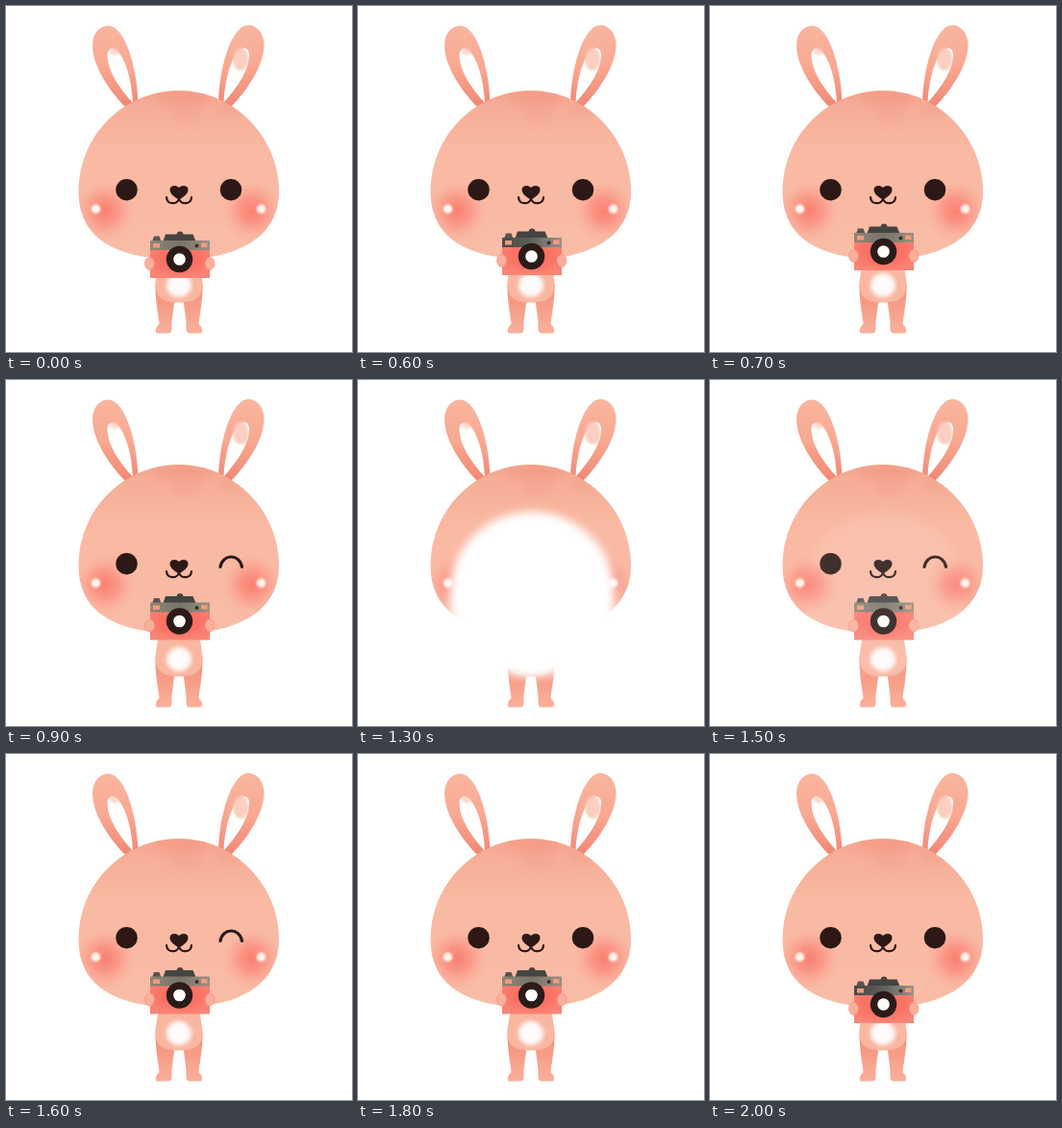
An HTML page that plays this animation: 360x360 px, repeating every 2.1 s.

```html
<!DOCTYPE html>
<html lang="en">
<head>
<meta charset="utf-8">
<title>Rabbit with a camera</title>
<style>
  html, body { margin: 0; width: 100%; height: 100%; overflow: hidden; background: #fff; }
  svg { display: block; width: 100%; height: 100%; }
</style>
</head>
<body>
<svg viewBox="0 0 360 360">
  <defs>
    <linearGradient id="skin" x1="0" y1="0" x2="0" y2="1">
      <stop offset="0" stop-color="#f6a68f"/>
      <stop offset=".14" stop-color="#f7af98"/>
      <stop offset=".36" stop-color="#f9b9a2"/>
      <stop offset="1" stop-color="#f9bca6"/>
    </linearGradient>
    <linearGradient id="earSkin" x1="0" y1="0" x2="0" y2="1">
      <stop offset="0" stop-color="#f9b59e"/>
      <stop offset=".5" stop-color="#f8a992"/>
      <stop offset="1" stop-color="#f18672"/>
    </linearGradient>
    <linearGradient id="legSkin" x1="0" y1="0" x2="0" y2="1">
      <stop offset="0" stop-color="#f38f7a"/>
      <stop offset=".5" stop-color="#f69e88"/>
      <stop offset="1" stop-color="#f9b19b"/>
    </linearGradient>
    <radialGradient id="cheek">
      <stop offset="0" stop-color="#fb7567" stop-opacity=".85"/>
      <stop offset=".4" stop-color="#fb8073" stop-opacity=".62"/>
      <stop offset=".75" stop-color="#fa9485" stop-opacity=".22"/>
      <stop offset="1" stop-color="#f9a896" stop-opacity="0"/>
    </radialGradient>
    <radialGradient id="coral" cx=".5" cy=".35" r=".65">
      <stop offset="0" stop-color="#f9685a"/>
      <stop offset=".6" stop-color="#fa7567"/>
      <stop offset="1" stop-color="#fa8475"/>
    </radialGradient>
    <linearGradient id="metal">
      <stop offset="0" stop-color="#8f8676"/>
      <stop offset=".5" stop-color="#77746a"/>
      <stop offset="1" stop-color="#99917f"/>
    </linearGradient>
    <linearGradient id="metalDark">
      <stop offset="0" stop-color="#4b4a48"/>
      <stop offset=".45" stop-color="#5d5d59"/>
      <stop offset="1" stop-color="#96948a"/>
    </linearGradient>
    <filter id="soft1" x="-50%" y="-50%" width="200%" height="200%"><feGaussianBlur stdDeviation=".8"/></filter>
    <filter id="soft2" x="-50%" y="-50%" width="200%" height="200%"><feGaussianBlur stdDeviation="2"/></filter>
    <filter id="soft5" x="-50%" y="-50%" width="200%" height="200%"><feGaussianBlur stdDeviation="5"/></filter>
    <path id="headShape" d="M180 88C236 88 284 135 284 193C284 240 242 263.500 180 263.500C116 263.500 75.500 243 75.500 193C75.500 134 123 88 180 88Z"/>
    <clipPath id="headClip"><use href="#headShape"/></clipPath>
    <g id="ear">
      <path fill="url(#earSkin)" d="M125 106C107 88 90 62 90 41C90 28 98 20 107 20.500C122 21 136 58 137.500 101Z"/>
      <path fill="#fff" d="M132 101C117 84 106 68 105.500 52C105 43 113 42 118 49C126 60 131 80 132 101Z"/>
    </g>
    <path id="leg" fill="url(#legSkin)" d="M155.500 288C155 305 158 318 159.500 331C156 334 154.500 338 157 340.500H168C171 341 172.500 339 172.500 336C172 325 174.500 318 175.500 303Z"/>
  </defs>

  <rect width="360" height="360" fill="#fff"/>

  <use href="#ear"/>
  <use href="#ear" transform="matrix(-1 0 0 1 358.500 -.5)"/>
  <ellipse cx="113" cy="47" rx="5" ry="4" fill="#f9c0ae" opacity=".6" filter="url(#soft1)"/>
  <ellipse cx="244" cy="55" rx="8" ry="12" fill="#fac6b6" opacity=".85" filter="url(#soft1)"/>

  <use href="#leg"/>
  <use href="#leg" transform="matrix(-1 0 0 1 360 0)"/>
  <path fill="#f9b6a0" d="M160 255H200C202 275 204.500 282 204.500 290C204.500 302 198 308.500 180 308.500C162 308.500 155.500 302 155.500 290C155.500 282 158 275 160 255Z"/>
  <ellipse cx="180" cy="290.500" rx="13" ry="12.500" fill="#fff" opacity=".95" filter="url(#soft2)"/>

  <use href="#headShape" fill="url(#skin)"/>
  <g clip-path="url(#headClip)">
    <g fill="#eb8170" filter="url(#soft5)">
      <ellipse cx="184" cy="95" rx="30" ry="8" opacity=".3"/>
      <ellipse cx="188" cy="113" rx="16" ry="8" opacity=".17"/>
      <ellipse cx="233" cy="108" rx="14" ry="9" opacity=".14"/>
    </g>
    <circle cx="103" cy="213" r="33" fill="url(#cheek)"/>
    <circle cx="256" cy="213" r="33" fill="url(#cheek)"/>
  </g>
  <g fill="#fff5ee" filter="url(#soft1)">
    <circle cx="93.500" cy="211.300" r="4.700"/>
    <circle cx="265.500" cy="211.300" r="4.700"/>
  </g>

  <g fill="#2c1815">
    <circle cx="125.500" cy="191.200" r="11.200"/>
    <circle id="eye" cx="234" cy="191.200" r="11.200"/>
    <path d="M180 201.500C175.500 199 170.500 195.500 170.500 191C170.500 186.500 177 185.500 180 189C183 185.500 189.500 186.500 189.500 191C189.500 195.500 184.500 199 180 201.500Z"/>
  </g>
  <g fill="none" stroke="#2c1815" stroke-linecap="round">
    <path stroke-width="2.200" d="M167 199C167.500 207 178 207 180 200.500C182 207 192.500 207 193 199"/>
    <path id="wink" stroke-width="3.200" d="M223 194.500C225.500 180.500 243 180.500 245.500 194.500"/>
  </g>

  <g id="camera">
    <path fill="#595650" d="M152 245L154 239.500H159.500L161.500 245Z"/>
    <path fill="#444440" d="M163.500 244.500L166 237.500H177.500Q178 234.500 181 234.500Q184 234.500 184.500 237.500H194.500L197.500 244.500Z"/>
    <rect x="150" y="253" width="62" height="30" fill="url(#coral)"/>
    <rect id="strip" x="150" y="244" width="62" height="10"/>
    <path fill="#f29a7d" d="M153 247H160V251.500H153ZM203 246.500H209.500V251H203Z"/>
    <circle cx="198.500" cy="249.500" r="2" fill="#35312d"/>
    <circle cx="180.500" cy="263.500" r="13.700" fill="#2b1b18"/>
    <circle cx="180.500" cy="263.500" r="6.300" fill="#fffdfa"/>
    <g fill="#f9af9a" stroke="#f18f7c" stroke-width=".6">
      <ellipse cx="149.500" cy="268" rx="5" ry="6.500"/>
      <ellipse cx="212" cy="268" rx="5" ry="6.500"/>
    </g>
  </g>

  <circle id="flash" cx="181" cy="223" r="86" fill="#fff" filter="url(#soft5)"/>
</svg>
<script>
  const LOOP = 2100;
  const [eye, wink, camera, strip, flash] =
    ["eye", "wink", "camera", "strip", "flash"].map(id => document.getElementById(id));

  // Each step is [start time, value], held until the next one.
  const lift = [[0, 0], [600, 3], [700, 8], [800, 12.5], [1900, 8], [2000, 3]];
  const glow = [[0, 0], [1300, 1], [1400, .5], [1500, .1], [1600, 0]];

  const hold = (steps, t) => steps.filter(([start]) => start <= t).pop()[1];
  const show = (el, on) => el.setAttribute("visibility", on ? "visible" : "hidden");

  function draw(t) {
    const up = hold(lift, t);
    const light = hold(glow, t);
    const winking = t >= 900 && t < 1800;
    camera.setAttribute("transform", `translate(0 ${-up})`);
    strip.setAttribute("fill", up === 3 ? "url(#metalDark)" : "url(#metal)");
    show(eye, !winking);
    show(wink, winking);
    show(flash, light > 0);
    flash.setAttribute("opacity", light);
  }

  function tick() {
    draw(performance.now() % LOOP);
    requestAnimationFrame(tick);
  }
  tick();
</script>
</body>
</html>
```
